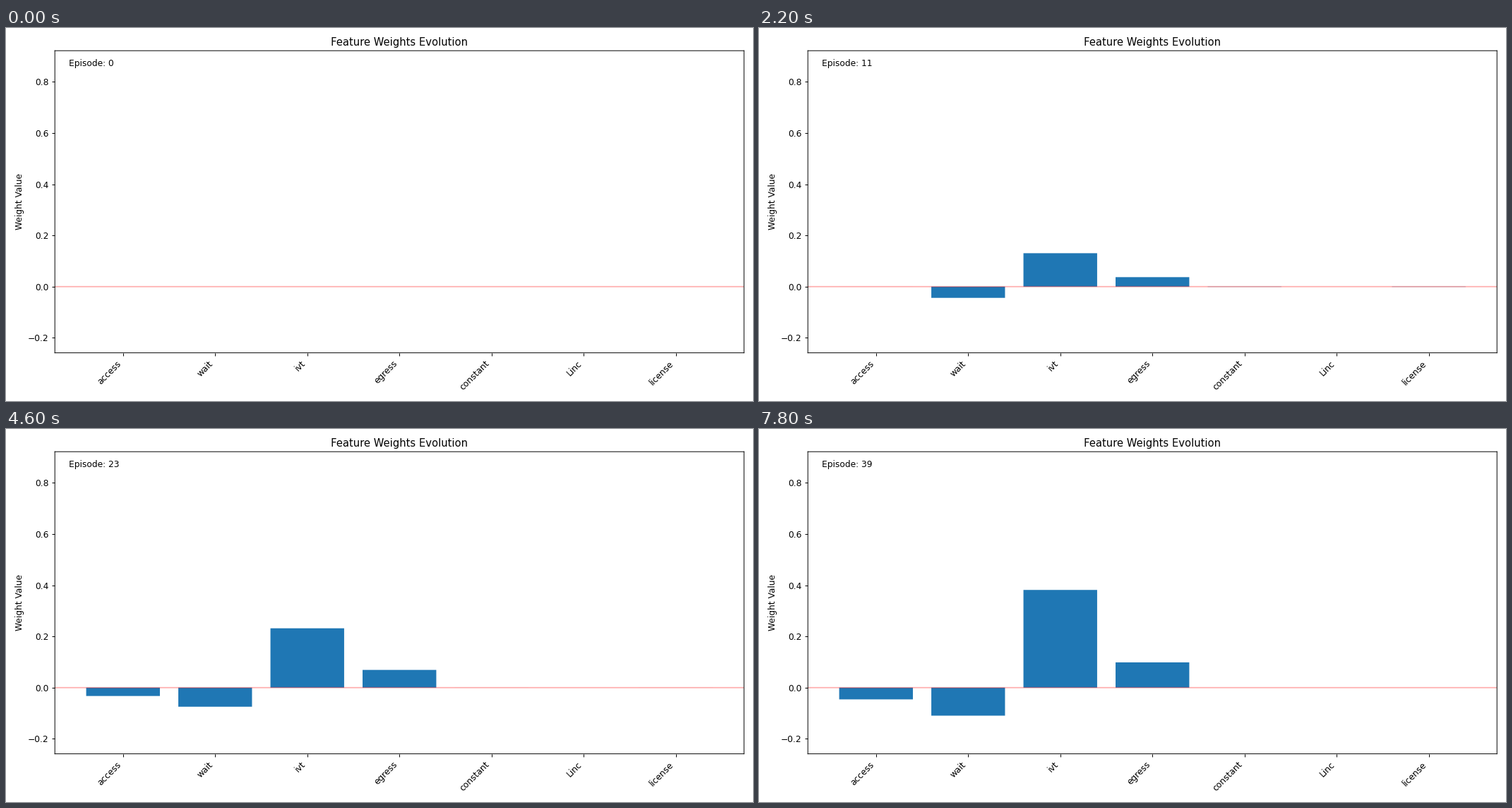
Animation, 1058 px wide and 529 px high, one loop 8000 ms. Source, as a matplotlib script:

```python
import numpy as np
import matplotlib.pyplot as plt
from matplotlib.animation import FuncAnimation

EPISODES = 40
plt.rcParams["font.family"] = "DejaVu Sans"


def settle(e, tau, power=1):
    """Rise from 0 to 1, flattening out after about tau episodes."""
    return 1 - np.exp(-(e / tau) ** power)


def bump(e, tau):
    """Quick rise that fades away again, steepest at the start."""
    return e * np.exp(-e / tau)


def access(e):
    return 0.0126 * bump(e, 4.54) - 0.047 * settle(e, 20, 2)


def wait(e):
    return -0.0021 * e - 0.0278 * settle(e, 8)


def ivt(e):
    late_jump = np.clip((e - 23) / 6, 0, 1)
    return 0.0083 * e + 0.041 * settle(e, 3.45) + 0.017 * late_jump


def egress(e):
    return 0.0037 * e - 0.00003 * e ** 2


def fading(e):
    return -0.002 * bump(e, 3.5)


def unused(e):
    return 0.0


weights = {"access": access, "wait": wait, "ivt": ivt, "egress": egress,
           "constant": fading, "Linc": unused, "license": fading}
slots = range(len(weights))

# Margins are in units of a 1200 x 600 layout.
fig = plt.figure(figsize=(12, 6), dpi=1058 / 12, facecolor="white")
fig.subplots_adjust(left=78.5 / 1200, right=1185.5 / 1200,
                    bottom=1 - 522.5 / 600, top=1 - 36.5 / 600)
ax = fig.add_subplot()

bars = ax.bar(slots, [0] * len(weights), color="tab:blue")
zero = ax.axhline(0, color="r", alpha=0.3)
for artist in [*bars, zero, *ax.spines.values()]:
    artist.set_snap(False)

ax.set_xlim(-0.74, 6.74)
ax.set_ylim(-0.2586, 0.9218)
ax.set_xticks(slots, weights, rotation=45, ha="right")
ax.set_ylabel("Weight Value")
ax.set_title("Feature Weights Evolution")
label = ax.text(0.02, 0.95, "", transform=ax.transAxes)


def update(episode):
    for bar, weight in zip(bars, weights.values()):
        bar.set_height(weight(episode))
    label.set_text(f"Episode: {episode}")
    return [*bars, label]


anim = FuncAnimation(fig, update, frames=EPISODES, interval=200,
                     repeat=True, repeat_delay=0, blit=False)
plt.show()
```
